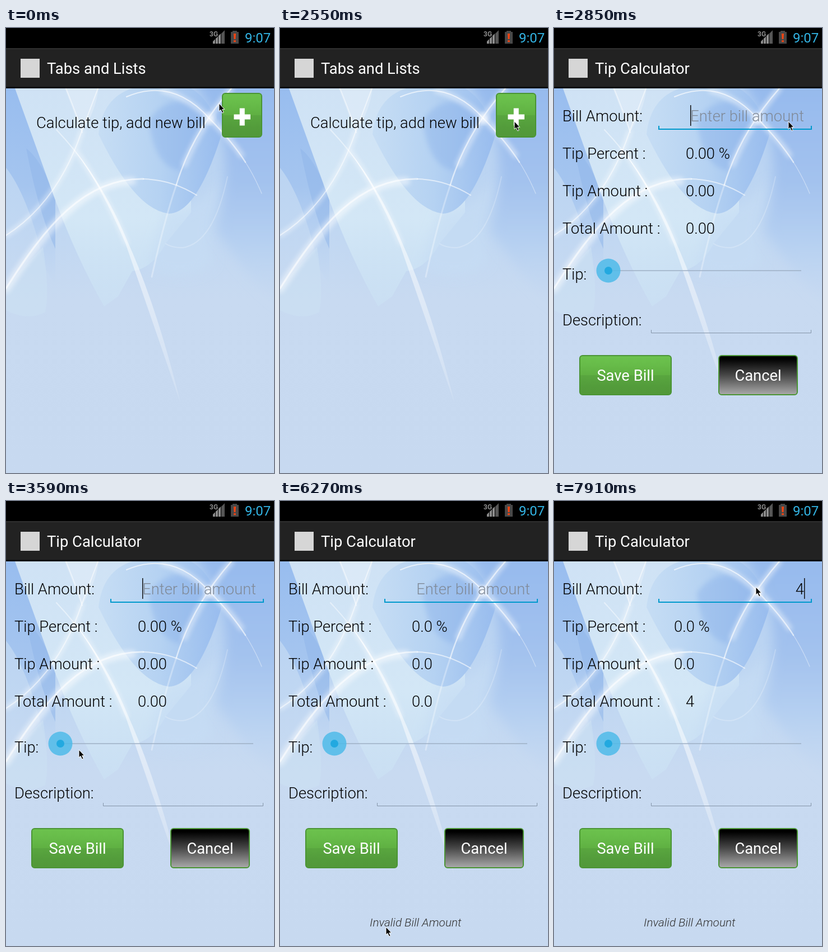
An HTML page for the animation above (8 s loop, 478 px wide and 796 px high).

```html
<!DOCTYPE html>
<html lang="en">
<head>
<meta charset="utf-8">
<title>Tip Calculator</title>
<style>
html, body { margin: 0; width: 100%; height: 100%; overflow: hidden; background: #000; }
svg { display: block; width: 478px; height: 796px; }
text { font: 300 27.35px Roboto, sans-serif; fill: #000; white-space: pre; }
.bar, .label { font-weight: 400; fill: #fff; }
.label { text-anchor: middle; }
.glow path { fill: none; stroke: #fff; stroke-linecap: round; }
</style>
</head>
<body>
<svg viewBox="0 0 478 796">
<defs>
  <linearGradient id="sky" x2="0" y2="1">
    <stop offset="0" stop-color="#b4d0f2"/><stop offset=".35" stop-color="#c0d7f2"/>
    <stop offset=".55" stop-color="#c8daf1"/><stop offset="1" stop-color="#c7d9f0"/>
  </linearGradient>
  <linearGradient id="deep" x2="0" y2="1">
    <stop offset="0" stop-color="#98bdef"/><stop offset=".5" stop-color="#a5c5ef"/>
    <stop offset="1" stop-color="#b8d1f1" stop-opacity="0"/>
  </linearGradient>
  <linearGradient id="side" x2="0" y2="1">
    <stop offset="0" stop-color="#94b9ed"/><stop offset=".45" stop-color="#a3c2ee"/>
    <stop offset=".68" stop-color="#b4cff1"/><stop offset="1" stop-color="#c5d9f1" stop-opacity="0"/>
  </linearGradient>
  <linearGradient id="ice" x2="0" y2="1">
    <stop offset="0" stop-color="#cfe2f5"/><stop offset=".6" stop-color="#d3e7f6"/>
    <stop offset="1" stop-color="#cbe2f4" stop-opacity=".6"/>
  </linearGradient>
  <linearGradient id="bowl">
    <stop offset="0" stop-color="#c6ddf4"/><stop offset=".5" stop-color="#b5d2f2"/>
    <stop offset="1" stop-color="#98bcee"/>
  </linearGradient>
  <linearGradient id="tail" gradientUnits="userSpaceOnUse" x1="0" y1="200" x2="0" y2="668">
    <stop offset="0" stop-color="#fff" stop-opacity=".65"/><stop offset=".5" stop-color="#fff" stop-opacity=".5"/>
    <stop offset="1" stop-color="#fff" stop-opacity=".15"/>
  </linearGradient>
  <linearGradient id="green" x2="0" y2="1">
    <stop offset="0" stop-color="#6cc24d"/><stop offset=".2" stop-color="#68bd4a"/>
    <stop offset=".5" stop-color="#5fb042"/><stop offset=".5" stop-color="#59a63f"/>
    <stop offset=".78" stop-color="#539c3b"/><stop offset="1" stop-color="#529839"/>
  </linearGradient>
  <linearGradient id="steel" x2="0" y2="1">
    <stop offset=".08" stop-color="#000"/><stop offset=".5" stop-color="#484848"/>
    <stop offset="1" stop-color="#aaa"/>
  </linearGradient>
  <filter id="soft" x="-20%" y="-20%" width="140%" height="140%"><feGaussianBlur stdDeviation="4"/></filter>
  <filter id="haze" x="-30%" y="-30%" width="160%" height="160%"><feGaussianBlur stdDeviation="10"/></filter>
  <clipPath id="page"><path d="M0 36H478V796H0Z"/></clipPath>

  <g id="base" clip-path="url(#page)">
    <path fill="url(#sky)" d="M0 108H478V796H0Z"/>
    <path fill="url(#deep)" d="M0 108H20L88 290V460L70 430Q40 300 0 250Z"/>
    <path fill="#8fb5e9" opacity=".5" d="M36 215Q62 235 88 300V395Q58 330 36 215Z"/>
    <path fill="#cbe2f4" opacity=".6" d="M0 462L66 392Q78 470 70 508Q40 525 0 505Z"/>
    <path fill="url(#ice)" d="M16 108H330V330L285 385Q262 430 225 435L200 480L175 498Q125 410 85 300Z"/>
    <path fill="#c6ddf4" opacity=".7" filter="url(#haze)" d="M285 330Q350 320 390 265Q350 370 372 420Q330 460 250 430Z"/>
    <path fill="url(#side)" filter="url(#haze)" d="M330 80H510V515Q420 440 375 360Q400 270 385 190Z"/>
    <path fill="url(#bowl)" d="M165 190Q172 125 225 108H330Q368 130 384 192Q340 332 290 332Q230 325 165 190Z"/>
    <path fill="#8bb2ea" opacity=".45" filter="url(#soft)" d="M255 165Q285 120 335 137L360 162Q335 205 312 255Q265 250 255 165Z"/>
    <path fill="#fff" opacity=".22" d="M105 108H165Q160 150 135 187Z"/>
    <g class="glow">
      <g filter="url(#soft)" opacity=".5">
        <path stroke-width="14" d="M0 467C70 360 140 274 225 274"/>
        <path stroke-width="7" d="M0 371Q92 312 135 185M125 220Q180 300 215 385"/>
        <path stroke-width="9" d="M280 112Q325 125 363 162T420 228M402 108Q350 170 318 245"/>
      </g>
      <path stroke-width="3" opacity=".6" d="M0 466C70 355 140 268 245 270"/>
      <path stroke-width="2" opacity=".6" d="M245 270Q295 271 340 299"/>
      <path stroke-width="2" opacity=".55" d="M0 371Q92 312 135 185Q152 140 164 108"/>
      <path stroke-width="2" opacity=".45" d="M107 108Q130 165 136 187M90 182Q140 235 171 292"/>
      <path style="fill:url(#tail);stroke:none" d="M120 215Q180 292 216 380Q268 495 311 670Q256 510 213 385Q172 287 120 215Z"/>
      <path stroke-width="2" opacity=".65" d="M215 123Q297 88 363 162"/>
      <path stroke-width="2.5" opacity=".6" d="M363 162Q405 205 427 240"/>
      <path stroke-width="1.3" opacity=".4" d="M427 240Q443 265 456 296"/>
      <path stroke-width="2.5" opacity=".6" d="M402 108Q332 188 304 280"/>
      <path stroke-width="3" opacity=".3" d="M304 280Q282 345 260 445"/>
      <path stroke-width="2" opacity=".22" d="M395 266Q370 385 315 393Q295 393 285 386"/>
    </g>
    <circle cx="363" cy="162" r="9" fill="#fff" opacity=".7" filter="url(#soft)"/>
    <path fill="#222" d="M0 36H478V108H0Z"/>
    <path fill="#303030" d="M0 36H478V38H0Z"/>
    <path fill="#0b0b0b" d="M0 105H478V108H0Z"/>
    <path fill="#d6d6d6" d="M26 55H60V89H26Z"/>
  </g>
</defs>

<g id="home">
  <use href="#base"/>
  <text class="bar" x="73" y="82">Tabs and Lists</text>
  <text x="54" y="179">Calculate tip, add new bill</text>
  <rect x="386" y="117" width="70" height="78" rx="5" fill="url(#green)" stroke="#4a9434" stroke-width="2"/>
  <path stroke="#fff" stroke-width="9" d="M406.500 159H436M421.250 143.500V174.500"/>
</g>
<path id="dim" opacity=".34" d="M0 36H478V796H0Z"/>

<g id="form">
  <use href="#base"/>
  <text class="bar" x="73" y="82">Tip Calculator</text>
  <text x="15" y="167">Bill Amount:</text>
  <text x="15" y="234">Tip Percent :</text>
  <text x="15" y="301">Tip Amount :</text>
  <text x="15" y="368">Total Amount :</text>
  <text x="15" y="450">Tip:</text>
  <text x="15" y="532">Description:</text>
  <text id="bill" x="446" y="167" text-anchor="end"></text>
  <path id="caret" fill="#111" d="M0 138h1.500v37h-1.500z"/>
  <text id="percent" y="234"></text>
  <text id="tip" y="301"></text>
  <text id="total" y="368"></text>
  <path fill="none" stroke="#0099cc" stroke-width="2" d="M187 175V181H459V175"/>
  <path fill="none" stroke="#8494a8" d="M173.500 540V545.500H458.500V540"/>
  <path stroke="#9eafc4" stroke-width="1.500" d="M97 434H441"/>
  <circle cx="97" cy="434" r="21.500" fill="#4fbbe9" opacity=".85"/>
  <circle cx="97" cy="434" r="7" fill="#22a9e0"/>
  <rect x="46" y="586" width="163" height="70" rx="5" fill="url(#green)" stroke="#4a9434" stroke-width="2"/>
  <text class="label" x="127.500" y="631">Save Bill</text>
  <rect x="294" y="586" width="140" height="70" rx="5" fill="url(#steel)" stroke="#4a9434" stroke-width="2"/>
  <text class="label" x="364" y="631">Cancel</text>
  <text id="error" x="160" y="761" style="font-size:20.8px;font-style:italic;fill:#333">Invalid Bill Amount</text>
</g>

<path d="M0 0H478V36H0Z"/>
<path fill="#8d8d8d" d="M369 28V24L373 20V28ZM374 28V19L378 15V28ZM379 28V14L383 10V28Z"/>
<path fill="#555" d="M384 28V10L390 4V28Z"/>
<text x="363" y="15" style="font-size:12px;font-weight:700;fill:#8d8d8d">3G</text>
<path fill="#484848" d="M404 5H412V7H415V28H401V7H404Z"/>
<path fill="#ff4411" d="M406 10H410L409.300 20H406.700ZM406.200 22H409.800V25H406.200Z"/>
<text x="426" y="26" style="font-size:24px;font-weight:400;fill:#33b5e5">9:07</text>
<path id="mouse" stroke="#fff" stroke-width="1" d="M0 0V14L3 11.200L5.800 17L8.200 16L5.600 10.400H9.800Z"/>
</svg>
<script>
const el = id => document.getElementById(id);
const show = (id, on) => el(id).style.display = on ? '' : 'none';
const LOOP = 8000, OPENING = 2700, OPEN = 2850, CHECKED = 5520, TYPED = 7910;

// time, x, y: the pointer jumps from place to place
const track = [
  [0, 380, 135], [150, 377, 142], [300, 386, 165], [450, 405, 185], [600, 419, 180],
  [750, 416, 166], [1500, 418, 167], [2990, 350, 270], [3140, 220, 400], [3290, 130, 445],
  [4630, 115, 455], [4780, 85, 470], [4930, 72, 480], [5080, 75, 530], [5230, 76, 585],
  [5380, 75, 618], [5970, 110, 650], [6120, 160, 715], [6270, 189, 762], [6420, 215, 690],
  [6570, 260, 530], [6710, 310, 340], [6860, 345, 205], [7010, 358, 158], [7310, 360, 154]
];
const blinks = [OPENING, 3140, 3590, 4190, 4630, 5230, 5670, 6120, 6710, 7160, 7760];

function write(id, x, text) {
  el(id).setAttribute('x', x);
  el(id).textContent = text;
}

function draw(t) {
  const opening = t >= OPENING && t < OPEN, typed = t >= TYPED;
  show('home', t < OPEN);
  show('dim', opening);
  show('form', t >= OPENING);
  el('form').setAttribute('opacity', opening ? .78 : 1);
  el('form').setAttribute('transform', opening ? 'translate(10 52) scale(.9623 .9592) translate(0 -36)' : '');

  const zero = t < CHECKED ? '0.00' : '0.0', left = typed ? 214 : 235;
  write('percent', left, zero + ' %');
  write('tip', left, zero);
  write('total', 235, typed ? '4' : zero);
  write('bill', 446, typed ? '4' : 'Enter bill amount');
  el('bill').style.fill = typed ? '' : '#808a98';
  show('error', t >= CHECKED);
  show('caret', blinks.filter(b => b <= t).length % 2);
  el('caret').setAttribute('transform', `translate(${typed ? 446 : 243})`);

  const [, x, y] = track.filter(p => p[0] <= t).pop();
  el('mouse').setAttribute('transform', `translate(${x} ${y})`);
}

const start = performance.now();
function tick() {
  draw((performance.now() - start) % LOOP);
  requestAnimationFrame(tick);
}
tick();
</script>
</body>
</html>
```
